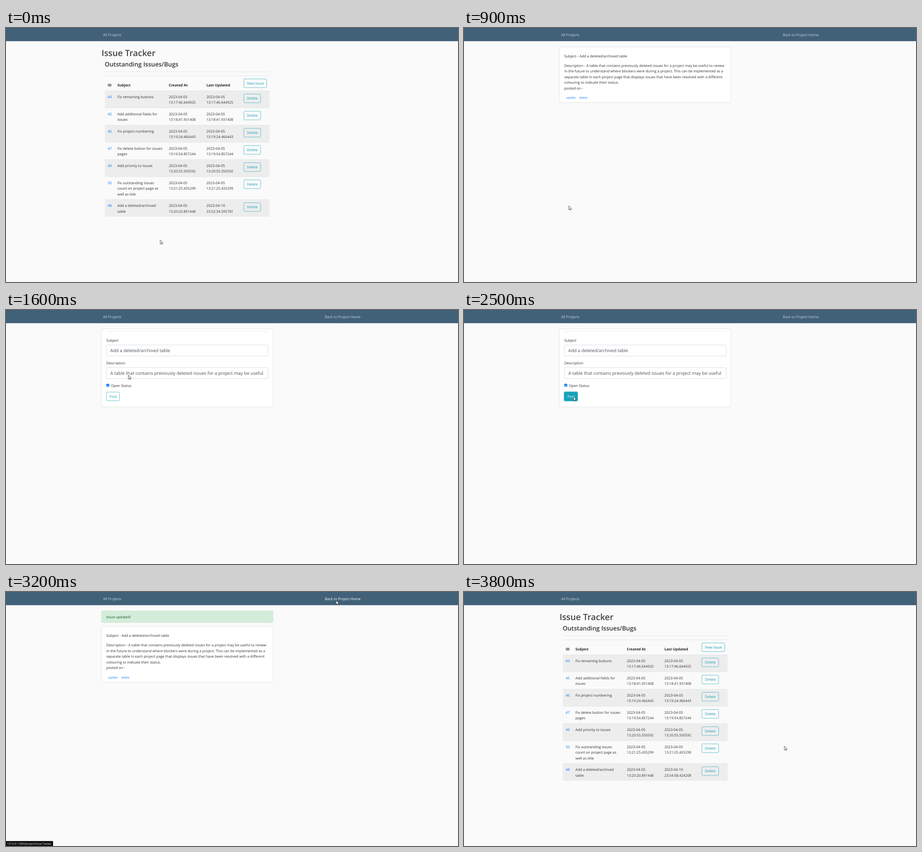
Recreate the animation shown at these times as an HTML page. Size 998x561 px, loop 4000 ms.

```html
<!DOCTYPE html>
<html lang="en">
<head>
<meta charset="utf-8">
<title>Issue Tracker</title>
<style>
  html, body { margin: 0; width: 100%; height: 100%; overflow: hidden; background: #fafafa; }
  svg { display: block; }
  text { font: 7.88px "Open Sans", "Noto Sans", sans-serif; fill: #333; text-rendering: geometricPrecision; white-space: pre; }
  .nav { fill: #cbd5db; }
  .white { fill: #fff; }
  .h1 { font-size: 18.9px; font-weight: 600; fill: #444; }
  .h3 { font-size: 13.6px; font-weight: 600; }
  .th { font-weight: 700; fill: #212529; }
  .time { font-size: 7.76px; }
  .link { fill: #007bff; }
  .small { font-size: 6.3px; fill: #007bff; }
  .info { fill: #17a2b8; }
  .input { font-size: 9.9px; fill: #495057; }
  .ok { fill: #155724; }
  .status { font-size: 5.8px; fill: #f2f2f2; }
</style>
</head>
<body>
<svg id="stage" width="998" height="561" viewBox="0 0 998 561"></svg>
<script>
const LOOP = 4000;
const stage = document.getElementById('stage');

const text = (x, y, str, cls = '') => `<text x="${x}" y="${y}" class="${cls}">${str}</text>`;
const lines = (x, y, list, cls) => list.map((s, i) => text(x, y + i * 12.48, s, cls)).join('');
const rect = (x, y, w, h, fill, stroke = 'none', r = 0, line = .8) =>
  `<rect x="${x}" y="${y}" width="${w}" height="${h}" rx="${r}" fill="${fill}" stroke="${stroke}" stroke-width="${line}"/>`;
const rule = (x, y, w, color, h = .8) => rect(x, y, w, h, color);
const group = (id, body, attrs = '') => `<g id="${id}" ${attrs}>${body}</g>`;
const button = (x, y, w, label) =>
  rect(x, y, w, 19.2, 'none', '#17a2b8', 2, .65) + text(x + 6.8, y + 12.4, label, 'info');
const card = (y, h) => rect(210.8, y, 378.8, h, '#fff', '#ddd', 1.6);

const issues = [
  [44, ['Fix remaining buttons'], '13:17:46.644925'],
  [45, ['Add additional fields for', 'issues'], '13:18:41.931408'],
  [46, ['Fix project numbering'], '13:19:24.466443'],
  [47, ['Fix delete button for issues', 'pages'], '13:19:54.857244'],
  [49, ['Add priority to issues'], '13:20:55.550592'],
  [50, ['Fix outstanding issues', 'count on project page as', 'well as title'], '13:21:25.435299'],
  [48, ['Add a deleted/archived', 'table'], '13:20:20.891448']
];

const stamp = (x, y, date, time) => text(x, y, date) + text(x, y + 12.48, time, 'time');

function listPage() {
  let out = text(210.9, 62, 'Issue Tracker', 'h1') +
    text(218, 85, 'Outstanding Issues/Bugs', 'h3') +
    rule(218.4, 96.4, 363.6, '#e3e3e3') + rule(218.4, 105.4, 363.6, '#dee2e6');
  const heads = [[224.6, 'ID'], [246, 'Subject'], [359.4, 'Created At'], [442.4, 'Last Updated']];
  out += heads.map(([x, s]) => text(x, 128.9, s, 'th')).join('') + button(525.2, 112.5, 50.4, 'New Issue');
  let top = 138.8;
  issues.forEach(([id, subject, time], i) => {
    const h = subject.length > 2 ? 50.4 : 37.94;
    const y = top + 16.2;
    if (i % 2 === 0) out += rect(218.4, top, 363.6, h, '#ededed');
    out += rule(218.4, top - .4, 363.6, '#dee2e6', i ? .6 : 1);
    out += text(224.4, y, id, 'link') + lines(246, y, subject) + stamp(359.4, y, '2023-04-05', time);
    if (id === 48) {
      out += group('before', stamp(442.4, y, '2023-04-10', '23:52:34.595781')) +
        group('after', stamp(442.4, y, '2023-04-10', '23:54:58.424208'));
    } else {
      out += stamp(442.4, y, '2023-04-05', time);
    }
    out += button(525.2, top + 7, 37, 'Delete');
    top += h;
  });
  return out;
}

const issueCard = card(41.8, 123) +
  text(221.4, 65, 'Subject - Add a deleted/archived table') +
  lines(221.4, 85.9, [
    'Description - A table that contains previously deleted issues for a project may be useful to review',
    'in the future to understand where blockers were during a project. This can be implemented as a',
    'separate table in each project page that displays issues that have been resolved with a different',
    'colouring to indicate their status.',
    'posted on -'
  ]) +
  text(225.6, 156.3, 'update', 'small') + text(254.3, 156.3, 'delete', 'small');

const field = (y, label, value) => text(221.4, y, label) +
  rect(221.6, y + 7.5, 357.2, 24.4, '#fff', '#ced4da', 2.4) +
  text(230.2, y + 23.6, value, 'input');

const formPage = card(41.8, 172.2) + rule(221.4, 47.1, 357.6, '#e5e5e5') +
  field(69.7, 'Subject', 'Add a deleted/archived table') +
  field(119.6, 'Description', 'A table that contains previously deleted issues for a project may be useful') +
  rect(221.6, 162.9, 6.4, 6.4, '#0075ff', 'none', 1) +
  '<path d="M222.9 166.2l1.4 1.5 2.5-3.2" fill="none" stroke="#fff" stroke-width=".9"/>' +
  text(231.7, 169.5, 'Open Status') +
  button(221.6, 181.3, 28.8, 'Post') +
  group('ring', rect(220.1, 179.8, 31.8, 22.2, '#8bd0db', 'none', 3)) +
  group('hover', rect(221.6, 181.3, 28.8, 19.2, '#17a2b8', '#17a2b8', 2) + text(228.4, 193.7, 'Post', 'white'));

const alertBox = rect(210.8, 41.8, 378.8, 25.6, '#d4edda', '#c3e6cb', 2) +
  text(221.4, 57.8, 'Issue updated!', 'ok');

const status = (id, w, path) => group(id,
  `<path d="M0 550H${w - 1.5}q1.5 0 1.5 1.5V561H0z" fill="#111"/>` +
  text(2.6, 557.8, '127.0.0.1:5000/project/Issue Tracker' + path, 'status'));

stage.innerHTML = rect(0, 0, 998, 561, '#fafafa') + rect(0, 0, 998, 29.12, '#416178') +
  text(214.6, 17.7, 'All Projects', 'nav') +
  group('back', text(704, 17.7, 'Back to Project Home', 'nav')) +
  group('backHover', text(704, 17.7, 'Back to Project Home', 'white')) +
  group('list', listPage()) +
  group('issue', issueCard) +
  group('form', formPage) +
  group('updated', alertBox + group('moved', issueCard, 'transform="translate(0 34.4)"')) +
  status('linkIssue', 113, '/48') + status('linkUpdate', 135, '/48/update') + status('linkHome', 104, '') +
  group('cursor', '<path d="M0 0V8.7L2 6.9 3.3 9.8 4.7 9.2 3.5 6.4 6.3 6.2z" fill="#fff" stroke="#222" stroke-width=".8" stroke-linejoin="round"/>');

// Holds each [time, style] row until the next one.
function play(id, rows) {
  const frames = rows.map(([t, style]) => ({ ...style, offset: t / LOOP, easing: 'step-end' }));
  frames.push({ ...rows[rows.length - 1][1], offset: 1 });
  document.getElementById(id).animate(frames, { duration: LOOP, iterations: Infinity });
}

// Shows at the first time, hides at the second, and so on.
function toggle(id, ...times) {
  const rows = times.map((t, i) => [t, { opacity: i % 2 ? 0 : 1 }]);
  if (times[0] > 0) rows.unshift([0, { opacity: 0 }]);
  play(id, rows);
}

toggle('list', 0, 900, 3500);
toggle('before', 0, 3500);
toggle('after', 3500);
toggle('issue', 900, 1500);
toggle('form', 1500, 2600);
toggle('updated', 2600, 3500);
toggle('hover', 2000, 2600);
toggle('ring', 2500, 2600);
toggle('back', 900, 3000);
toggle('backHover', 3000, 3500);
toggle('linkIssue', 600, 900);
toggle('linkUpdate', 1300, 1500);
toggle('linkHome', 3100, 3500);

const path = [
  [0, 340.5, 468.3], [100, 392, 400], [200, 486, 210], [300, 420, 55.5], [400, 290, 90],
  [500, 238, 270], [600, 230, 386], [700, 231.4, 392.4], [800, 231.4, 392.8],
  [1000, 232, 360], [1100, 235, 270], [1200, 238, 190], [1300, 240, 158], [1400, 240.7, 155],
  [1500, 246, 154], [1600, 270.2, 143.9], [1700, 275, 142.6], [1900, 258, 168], [2000, 241.8, 191.4],
  [2600, 246, 198], [2700, 300, 165], [2800, 440, 110], [2900, 610, 55], [3000, 712, 22],
  [3100, 728, 19.2], [3200, 728.9, 18.8], [3500, 727, 32], [3600, 716, 140], [3700, 707, 280], [3800, 707.5, 340.4]
];
play('cursor', path.map(([t, x, y]) => [t, { transform: `translate(${x}px, ${y}px)` }]));
</script>
</body>
</html>
```
